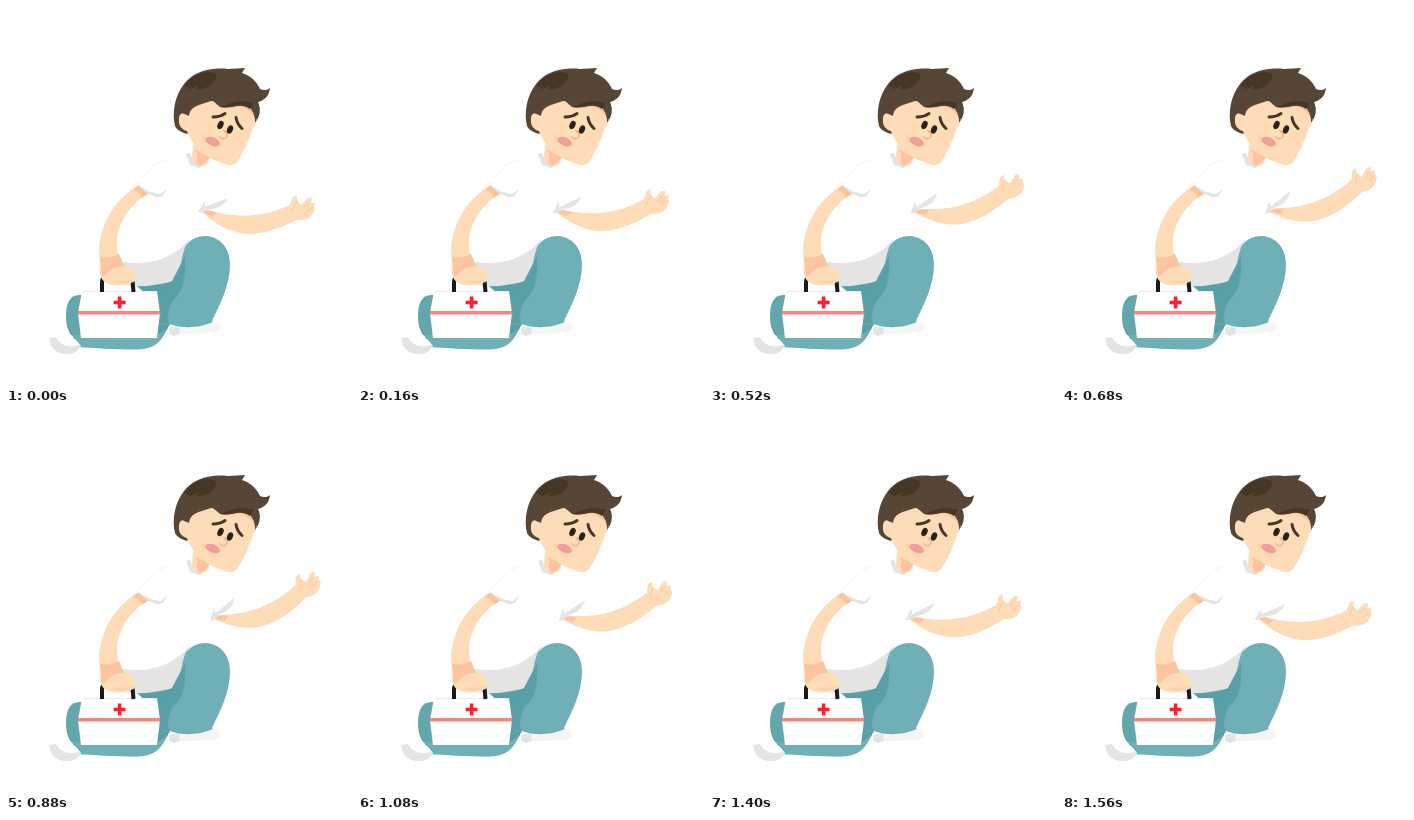
Recreate the animation shown at these times as an HTML page. Size 346 by 379 pixels, loop 1600 ms.

```html
<!DOCTYPE html>
<html lang="en">
<head>
<meta charset="utf-8">
<title>First aid</title>
<style>
html, body { margin: 0; width: 100%; height: 100%; overflow: hidden; background: #fff; }
svg { display: block; width: 100vw; height: 100vh; }
.skin { fill: #fedcb8; }
.blush { fill: #fcc49e; }
.hair { fill: #574636; }
.hair-dark { fill: #453626; }
.teal { fill: #6fb0b7; }
.teal-mid { fill: #62a7ae; }
.teal-dark { fill: #589fa7; }
.white { fill: #fff; }
.grey { fill: #e4e4e4; }
.pale { fill: #f5f5f5; }
.line { fill: none; stroke-linecap: round; stroke-linejoin: round; }
</style>
</head>
<body>
<svg viewBox="0 0 346 379">
  <!-- far shoe -->
  <path class="pale" d="M171 321L206 315C212 317 216 321 214 325C203 328 183 328 170 328Z"/>
  <path class="grey" d="M163 322L173 320L174 328L168 330L163 328Z"/>

  <!-- kneeling leg -->
  <path class="teal-mid" d="M75 289C64 288 60 297 60 310C60 319 62 325 65 329L84 336L84 290Z"/>
  <path class="teal-dark" d="M124 274L160 262L184 240L188 284L166 300L164 318C160 326 157 331 152 335L140 332V288Z"/>
  <path class="teal" d="M66 329L152 329L161 322C156 337 147 343 132 343.5C108 343.5 88 342 72 341Z"/>

  <!-- kneeling shoe -->
  <path class="white" d="M43 332C50 328 62 328 70 334L75 340L66 348L50 345Z"/>
  <path class="grey" d="M43 332C44 342 50 348 61 348C70 348 75 343 74 338C68 342 55 341 50 331Z"/>

  <!-- shirt -->
  <path class="white" d="M150 154L180 148L203 154L222 180L203 205L185 236L168 274L128 280L100 258L120 210L132 180Z"/>
  <path class="grey" d="M93 262L118 256C142 260 168 253 184 232C179 246 177 262 167 275C154 279 138 281 125 280L98 276Z"/>

  <!-- raised knee -->
  <path class="teal" d="M179 241C184 233 192 230 200 230C215 231 224 243 224 258C224 280 214 298 206 315L207 316C193 322 177 323 164 318C158 319 155 318 153 315C157 304 163 298 168 290C174 278 173 258 179 241Z"/>
  <path class="teal-dark" d="M179 250C180 270 178 284 168 293C163 299 161 307 163 318L154 317L154 292L166 275Z"/>

  <!-- neck and collar -->
  <path class="grey" d="M180 148L184 159L193 162L203 156L202 152L193 158L187 154L184 147Z"/>
  <path class="skin" d="M187 138L205 149L200 159L192 160L186 153Z"/>
  <path class="blush" d="M188 143L204 151L200 156L194 160C190 158 190 153 192 149Z"/>

  <!-- reaching arm -->
  <g id="arm">
    <path class="skin" d="M195 202C215 208 231 211 248 209C262 208 275 203 284 199L287 191L291 189L291 195L295 199L302 192L306 192L305 197L309 197L308 201L309 204L306 209C302 214 296 215 290 214C275 222 260 228 240 228C220 226 207 216 195 205Z"/>
    <path class="blush" d="M196 202L211 207L206 211L195 205Z"/>
    <path class="line" stroke="#fbc9a2" d="M286 205L291 195M297 202L303 197M300 206L306 202"/>
    <path class="white" d="M194 169L209 173L223 192L210 202L195 206L191 194Z"/>
    <path class="grey" d="M192 206L199 195L199 201L222 192C219 199 212 203 204 203L194 207Z"/>
  </g>

  <!-- head -->
  <path class="hair" d="M169 120C166 108 168 91 178 78C188 65 205 61 222 63L239 62L236 67C245 70 251 76 254 83C258 85 262 84 264 82C263 90 259 94 252 96C256 104 253 113 248 118L234 109L190 118L181 128C175 126 171 124 169 120Z"/>
  <path class="skin" d="M178 107C180 101 190 96 207 95L214 100L238 97C245 100 251 105 251 113C245 124 242 141 231 156C227 160 222 160 217 157C203 153 188 144 181 125C176 124 172 119 173 113C173 109 175 107 178 107Z"/>
  <path class="blush" d="M214 101C224 102 237 94 247 104C250 107 251 110 250 115C246 106 239 101 232 101C225 103 219 103 214 101Z"/>
  <path class="hair" d="M176 107C181 84 208 76 236 82C251 87 258 101 249 117C250 105 241 97 235 97C228 102 221 102 214 101L206 94C195 100 185 98 183 110Z"/>
  <path class="hair-dark" d="M215 101C224 96 236 93 248 97L244 103C234 96 227 103 215 101Z"/>
  <path class="hair-dark" d="M178 80C185 70 198 63 210 68C213 74 203 84 190 83L194 79L184 83Z"/>
  <path class="line" stroke="#463729" stroke-width="3" d="M207 111Q214 111 219 107.5M230 111.5Q231 118 236 122.5"/>
  <ellipse cx="214.5" cy="119" rx="2.9" ry="4.4" fill="#2b211b" transform="rotate(22 214.5 119)"/>
  <ellipse cx="224" cy="123.5" rx="2.9" ry="4.4" fill="#2b211b" transform="rotate(22 224 123.5)"/>
  <path class="line" stroke="#f9b18a" stroke-width="1.5" d="M218 125C223 128 222 132 217 133L214 131"/>
  <path d="M199 133C203 128 213 132 214 138C212 142 206 141 200 136Z" fill="#f69c97"/>
  <path class="line" stroke="#fac4a0" d="M198 130Q196 134 198 137"/>

  <!-- medical bag -->
  <path class="white" d="M76 285H151L154 307L151 332H75L72 307Z"/>
  <path class="line" stroke="#eee" d="M77 285.5H150"/>
  <path d="M72 305H154.5V308.5H72Z" fill="#f4857f"/>
  <path d="M111.8 290.5h3.6v4.2h4.2v3.6h-4.2v4.2h-3.6v-4.2h-4.2v-3.6h4.2z" fill="#fb2029"/>
  <path fill="none" stroke="#17191b" stroke-width="4" d="M96 286V276Q96 271 102 270H121Q126 270 126.500 275L127.500 286"/>

  <!-- carrying arm -->
  <path class="skin" d="M132 179C109 194 95 216 93 244L94 262C93 272 97 277 106 279C116 280 126 278 130 274C131 266 126 261 117 259L113 251C107 230 114 206 142 187Z"/>
  <path class="blush" d="M132 180L143 187L136 192C134 187 131 185 127 184Z"/>
  <path class="blush" d="M94 250C102 253 108 251 113 248L118 260L107 262L96 271Z"/>
  <path class="line" stroke="#fbc9a2" d="M109 276Q117 278 126 274"/>
  <path class="white" d="M151 154L133 178Q143 188 154 190L166 176Z"/>
  <path class="grey" d="M131 178C139 184 148 188 155 188L161 182C158 189 156 192 151 191C143 189 136 184 131 178Z"/>
  <path class="line" stroke="#f2f2f2" d="M160 154Q148 157 144 164L132 178"/>
</svg>
<script>
const LOOP = 1600, STEP = 40, SWING = 20;
const arm = document.getElementById('arm');

function draw(now) {
  const t = Math.floor((now % LOOP) / STEP) * STEP;
  const lift = 1 - Math.abs(1 - 2 * t / LOOP);
  arm.setAttribute('transform', `rotate(${-SWING * lift} 202 168)`);
}

const start = performance.now();
function tick() {
  draw(performance.now() - start);
  requestAnimationFrame(tick);
}
tick();
</script>
</body>
</html>
```
